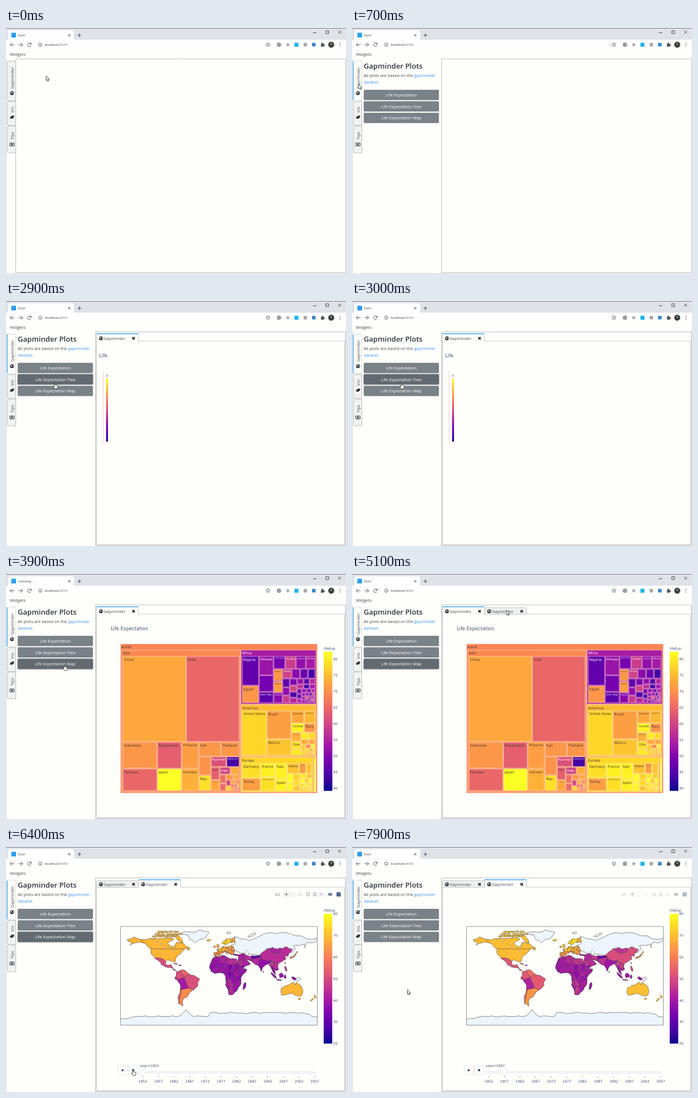
Recreate the animation shown at these times as an HTML page with a canvas. Size 610 by 440 pixels, loop 8000 ms.

```html
<!DOCTYPE html>
<html lang="en">
<head>
<meta charset="utf-8">
<title>Dash</title>
<style>
  html, body { margin: 0; width: 100%; height: 100%; overflow: hidden; background: #fefefb; }
  canvas { display: block; width: 610px; height: 440px; }
</style>
</head>
<body>
<canvas id="stage"></canvas>
<script>
const cv = document.getElementById('stage'), g = cv.getContext('2d');
const dpr = window.devicePixelRatio || 1;
cv.width = 610 * dpr; cv.height = 440 * dpr;

const LOOP = 8000, PAPER = '#fefefb', INK = '#2a3f5f', ICON = '#54575b', DARK = '#2c2f33';
const UI = '"Open Sans", "Noto Sans", sans-serif', PLOT = '"DejaVu Sans", sans-serif';

// ---------- helpers ----------
function paint(fill, stroke, lw = 1) {
  if (fill) { g.fillStyle = fill; g.fill(); }
  if (stroke) { g.strokeStyle = stroke; g.lineWidth = lw; g.stroke(); }
}
function rect(x, y, w, h, fill, stroke, lw) {
  g.beginPath(); g.rect(x, y, w, h); paint(fill, stroke, lw);
}
function round(x, y, w, h, r, fill, stroke, lw) {
  g.beginPath(); g.roundRect(x, y, w, h, r); paint(fill, stroke, lw);
}
function disc(x, y, r, fill, stroke, lw) {
  g.beginPath(); g.arc(x, y, r, 0, 7); paint(fill, stroke, lw);
}
function path(pts, close) {
  g.beginPath();
  pts.forEach(p => g.lineTo(p[0], p[1]));
  if (close) g.closePath();
}
const pairs = s => s.trim().split(/\s+/).map(p => p.split(',').map(Number));
const line = (s, color, lw) => { path(pairs(s)); paint(null, color, lw); };
function cross(x, y, r, color, lw) {
  path([[x - r, y - r], [x + r, y + r]]); paint(null, color, lw);
  path([[x + r, y - r], [x - r, y + r]]); paint(null, color, lw);
}
function plus(x, y, r, color, lw) {
  path([[x - r, y], [x + r, y]]); paint(null, color, lw);
  path([[x, y - r], [x, y + r]]); paint(null, color, lw);
}
function text(s, x, y, size, color, { font = UI, align = 'left', weight = 400 } = {}) {
  g.font = `${weight} ${size}px ${font}`;
  g.textAlign = align;
  g.fillStyle = color; g.fillText(s, x, y);
  return x + g.measureText(s).width;
}
const label = (s, x, y, size = 6.1, align = 'left') => text(s, x, y, size, '#3a4d6a', { font: PLOT, align });
const noise = n => { const v = Math.sin(n * 127.1 + 3.7) * 43758.5453; return v - Math.floor(v); };
const clamp = v => Math.max(0, Math.min(1, v));
const ramp = (t, from, to) => clamp((t - from) / (to - from));

const STOPS = '0d0887 46039f 7201a8 9c179e bd3786 d8576b ed7953 fb9f3a fdca26 f0f921'.split(' ')
  .map(h => [0, 2, 4].map(i => Math.min(255, parseInt(h.substr(i, 2), 16) * 1.05)));
function plasma(f) {
  f = clamp(f) * 9;
  const i = Math.min(8, Math.floor(f)), k = f - i;
  return `rgb(${STOPS[i].map((c, j) => Math.round(c + (STOPS[i + 1][j] - c) * k))})`;
}
function colorbar(x, y, w, h) {
  const gr = g.createLinearGradient(0, y + h, 0, y);
  for (let i = 0; i <= 9; i++) gr.addColorStop(i / 9, plasma(i / 9));
  rect(x, y, w, h, gr);
}

// ---------- browser ----------
function browser(title) {
  rect(0, 0, 610, 21, '#dfe2e7');
  rect(0, 0, 610, 1, '#7b8086');
  round(4, 4, 118, 20, 4, '#fefefe');
  rect(0, 21, 610, 19, '#fefefe');
  round(9.5, 8.5, 8.5, 8.5, 1, '#2c9fec');
  text(title, 21.5, 15, 5.6, '#4a4d52');
  cross(113.5, 13, 2, '#444');
  plus(131.7, 13, 3.2, '#444');
  line('551,8.5 556.5,8.5', '#333');
  rect(573.8, 5, 5, 5, null, '#333', .9);
  cross(598.5, 7.5, 2.5, '#333', .9);

  for (const [x, d] of [[7.5, 1], [30, -1]]) {
    path([[x, 30], [x + 7.5 * d, 30]]); paint(null, ICON);
    path([[x + 3.5 * d, 26.5], [x, 30], [x + 3.5 * d, 33.5]]); paint(null, ICON);
  }
  g.beginPath(); g.arc(42, 30, 3.2, .5, 5.6); paint(null, ICON);
  path(pairs('45.8,26.2 45.8,29.6 42.4,29.6'), true); paint(ICON);
  disc(61.5, 30, 3.1, null, ICON, .8);
  line('61.5,29.6 61.5,32', ICON, .9); line('61.5,28 61.5,28.8', ICON, .9);
  text(':8050', text('localhost', 69.5, 32.2, 6.1, '#333'), 32.2, 6.1, '#777');

  path(Array.from({ length: 10 }, (_, i) => {
    const a = i * Math.PI / 5 - Math.PI / 2, r = i % 2 ? 1.7 : 3.8;
    return [470 + r * Math.cos(a), 30 + r * Math.sin(a)];
  }), true);
  paint(null, ICON, .8);
  disc(489.7, 30, 4, '#9b9da0');
  disc(505.5, 30, 3, '#b4b6b8');
  rect(517.5, 26.5, 7.2, 7.2, '#1db4ee');
  disc(537, 30, 3.4, '#a9abad');
  rect(549, 26.7, 6.4, 6.4, '#3c86c6');
  rect(565, 28.2, 5.4, 5.4, ICON); disc(567.6, 27.6, 1.4, ICON); disc(571, 30.8, 1.4, ICON);
  disc(583.5, 30, 5.4, '#3a403b'); disc(583.5, 28.6, 1.8, '#85887f');
  for (let i = -1; i < 2; i++) disc(599, 30 + i * 3, .8, ICON);
  rect(0, 39, 610, 401, PAPER);
  text('Widgets', 7, 50, 7.5, '#43474b');
}

// ---------- page ----------
function globe(x, y) {
  disc(x, y, 3.5, DARK);
  g.save(); g.translate(x, y);
  path(pairs('-2.4,-1.4 -.6,-2.6 .4,-1 -.8,.1 -.3,2 -1.5,.6'), true); paint('#e8e9ea');
  rect(1.2, -.8, 1.2, 1.9, '#e8e9ea');
  g.restore();
}
function sideTab(y, h, name, base, active) {
  round(2.5, y + .5, 15, h - 1, [2, 0, 0, 2], active ? PAPER : '#f1f2f2', active ? '#dcdddd' : '#b9bbbc');
  if (active) rect(1.6, y + 1, 1.3, h - 2, '#3ea5ee');
  g.save(); g.translate(13.6, base); g.rotate(-Math.PI / 2);
  text(name, 0, 0, 7.4, '#4a4d50');
  g.restore();
}
function sidebar(open) {
  rect(0, 55, 1, 385, '#d5d7d8');
  sideTab(59, 72, 'Gapminder', 109, open);
  sideTab(131.5, 44, 'Iris', 152, false);
  sideTab(175.5, 49, 'Tips', 200.5, false);
  globe(10.7, 117);
  g.beginPath(); g.moveTo(7, 163); g.quadraticCurveTo(7, 157, 14.5, 157);
  g.quadraticCurveTo(14.5, 164, 8.4, 162.6); paint(DARK);
  rect(6.9, 206.6, 7.6, 5.2, null, DARK); disc(10.7, 209.2, 1.6, DARK);
}
function button(y, name, dark, ring) {
  if (ring) round(20, y - 1, 137, 20.5, 3, '#c3c7ca');
  round(21, y, 135, 18.5, 2, dark ? '#636b70' : '#7a8288');
  text(name, 88.5, y + 11.9, 7.45, '#fff', { align: 'center' });
}
function panel(t) {
  text('Gapminder Plots', 21, 73, 13.1, '#2f3439', { weight: 600 });
  text('gapminder', text('All plots are based on the ', 21, 88.4, 7.5, '#43474b'), 88.4, 7.5, '#3b93ec');
  text('.', text('dataset', 21, 100.4, 7.5, '#3b93ec'), 100.4, 7.5, '#43474b');
  button(111, 'Life Expectation');
  button(131.6, 'Life Expectation Tree', t >= 1500 && t < 3800, t >= 1900 && t < 3800);
  button(152.2, 'Life Expectation Map', t >= 3400 && t < 6900, t >= 3800 && t < 6900);
}
function tab(x, active) {
  const y = active ? 58 : 60;
  round(x + .5, y + .5, 75, 72 - y, [2, 2, 0, 0], active ? PAPER : '#eeefef', '#c2c4c5', .9);
  if (active) { rect(x + .5, 58, 75, 1.4, '#3ea5ee'); rect(x + 1, 71, 74, 2, PAPER); }
  globe(x + 8.3, 67);
  text('Gapminder', x + 13.2, 69.8, 7.4, '#4a4d50');
  cross(x + 66.8, 67, 2.2, '#222', 1.7);
}

// ---------- treemap ----------
// Populations: the largest are given, the rest shrink by a constant ratio.
function continent(name, life, heads, next, ratio, count, spread, known) {
  const named = known.split(', ').map(s => s.match(/^(.*) (\S+)$/));
  const kids = Array.from({ length: count }, (_, i) => ({
    name: named[i] ? named[i][1] : '',
    life: named[i] ? +named[i][2] : life + spread * (noise(life + i) - .5),
    v: heads[i] || next * ratio ** (i - heads.length)
  }));
  return { name, life, kids, v: kids.reduce((s, k) => s + k.v, 0) };
}
const WORLD = [
  continent('Asia', 69.4, [1319, 1110], 223, .84, 33, 20,
    'China 73, India 65, Indonesia 71, Pakistan 65, Bangladesh 64, Japan 83, Philippines 72, Vietnam 74, Iran 71, Thailand 71, Korea, Rep. 79, Myanmar 62, Afghanistan 44, Nepal 64, Saudi Arabia 73, Iraq 60'),
  continent('Africa', 54.5, [135, 80, 76, 65], 44, .925, 52, 22,
    'Nigeria 47, Egypt 71, Ethiopia 53, Congo, Dem. Rep. 46, South Africa 49, Sudan 59, Tanzania 52, Kenya 54, Morocco 71, Algeria 72, Uganda 51, Ghana 60'),
  continent('Americas', 75.4, [301, 190, 109], 44, .853, 25, 14,
    'United States 78, Brazil 72, Mexico 76, Colombia 73, Argentina 75, Canada 81, Peru 71, Venezuela 74, Chile 79'),
  continent('Europe', 77.9, [82, 71, 61, 60, 58, 40, 38], 22, .876, 30, 9,
    'Germany 79, Turkey 72, France 81, United Kingdom 79, Italy 81, Spain 81, Poland 76, Romania 72'),
  continent('Oceania', 81, [20], 4, 1, 2, 0, 'Australia 81, New Zealand 80')
];

function squarify(items, x0, y0, x1, y1) {
  let value = items.reduce((s, k) => s + k.v, 0), i = 0;
  while (i < items.length) {
    const dx = x1 - x0, dy = y1 - y0, row = [items[i]];
    const max = items[i].v, alpha = Math.max(dy / dx, dx / dy) / value;
    let sum = max, best = Infinity;
    const worst = min => { const b = sum * sum * alpha; return Math.max(max / b, b / min); };
    best = worst(max);
    while (++i < items.length) {
      sum += items[i].v;
      const r = worst(items[i].v);
      if (r > best) { sum -= items[i].v; break; }
      best = r; row.push(items[i]);
    }
    const flat = dx < dy, thick = (flat ? dy : dx) * sum / value;
    let at = flat ? x0 : y0;
    for (const k of row) {
      const len = (flat ? dx : dy) * k.v / sum;
      k.box = flat ? [at, y0, len, thick] : [x0, at, thick, len];
      at += len;
    }
    if (flat) y0 += thick; else x0 += thick;
    value -= sum;
  }
}
const GAP = 1.5, PAD = 2.3, HEAD = 11.2;
function nest(kids, [x, y, w, h]) {
  const e = GAP / 2;
  squarify(kids, x + PAD - e, y + HEAD - e, x + w - PAD + e, y + h - PAD + e);
  kids.forEach(k => {
    const [a, b, c, d] = k.box;
    k.box = [a + e, b + e, Math.max(.2, c - GAP), Math.max(.2, d - GAP)];
  });
}
function cell({ name, life, box: [x, y, w, h] }) {
  const f = (life - 39.6) / 43;
  rect(x, y, w, h, plasma(f), 'rgba(255,245,240,.75)', .7);
  if (!name || w < 6) return;
  g.font = `6.2px ${PLOT}`;
  const size = Math.min(6.2, 6.2 * (w - 3) / g.measureText(name).width);
  if (size > 1) text(name, x + 1.6, y + 1.8 + size * .95, size, f < .54 ? '#fff' : '#4a3a34', { font: PLOT });
}
const ROOT = { name: 'world', life: 68.9, box: [205.5, 125.5, 353, 268] };
nest(WORLD, ROOT.box);
WORLD.forEach(c => nest(c.kids, c.box));

function treemap() {
  label('Life Expectation', 188, 100.8, 8.3);
  cell(ROOT);
  for (const c of WORLD) { cell(c); c.kids.forEach(cell); }
  label('lifeExp', 570, 135.5);
  colorbar(570, 139.5, 15.5, 250);
  for (let v = 40; v <= 80; v += 5) label(v, 587, 389.5 - (v - 39.6) * 5.81);
}

// ---------- world map ----------
const px = ([lon, lat]) => [382 + lon * .981, 231.3 - lat * .984];

// Coasts: a few corners, broken up by midpoint displacement.
// The offset depends only on the edge, so shared borders stay joined.
function rough(a, b, n) {
  if (!n) return [a];
  const s = a[0] < b[0] || (a[0] === b[0] && a[1] < b[1]) ? 1 : -1;
  const k = s * (noise(a[0] + b[0] + 1.7 * (a[1] + b[1])) - .5) * .28;
  const m = [(a[0] + b[0]) / 2 - (b[1] - a[1]) * k, (a[1] + b[1]) / 2 + (b[0] - a[0]) * k];
  return [...rough(a, m, n - 1), ...rough(m, b, n - 1)];
}
const coast = s => {
  const p = pairs(s).map(px);
  return p.flatMap((a, i) => rough(a, p[(i + 1) % p.length], 2));
};
const blob = (lon, lat, rx, ry = rx, tilt = 0) => Array.from({ length: 9 }, (_, i) => {
  const a = i * Math.PI * 2 / 9, r = .75 + .5 * noise(lon + lat + i);
  const u = rx * r * Math.cos(a), v = ry * r * Math.sin(a);
  return px([lon + u * Math.cos(tilt) - v * Math.sin(tilt), lat + u * Math.sin(tilt) + v * Math.cos(tilt)]);
});

const EDGE = '#4a4a4a', LAND = '#ebf5fb', areas = [];
const area = (pts, v, parts = [], gain = 2) => areas.push({ pts, v, parts, gain });
const land = (s, ...rest) => area(coast(s), ...rest);

// Countries inside a coast: the cells nearest to each seed [lon, lat, value].
function voronoi(seeds) {
  const pts = seeds.map(px), R = 300;
  return pts.map((p, i) => {
    let poly = [[-R, -R], [R, -R], [R, R], [-R, R]].map(c => [p[0] + c[0], p[1] + c[1]]);
    pts.forEach((q, j) => {
      if (i === j) return;
      const nx = q[0] - p[0], ny = q[1] - p[1];
      const side = a => (a[0] - (p[0] + q[0]) / 2) * nx + (a[1] - (p[1] + q[1]) / 2) * ny;
      poly = poly.flatMap((a, k) => {
        const b = poly[(k + 1) % poly.length], sa = side(a), sb = side(b), f = sa / (sa - sb);
        const out = sa <= 0 ? [a] : [];
        if ((sa < 0) !== (sb < 0)) out.push([a[0] + (b[0] - a[0]) * f, a[1] + (b[1] - a[1]) * f]);
        return out;
      });
    });
    return { pts: poly, v: seeds[i][2] };
  });
}
function scatter(lon0, lon1, lat0, lat1, step, value) {
  const out = [];
  for (let lat = lat0; lat < lat1; lat += step)
    for (let lon = lon0; lon < lon1; lon += step * 1.15) {
      const k = lat * 3.1 + lon * 7.3;
      out.push([lon + noise(k) * step * .9, lat + noise(k + 1) * step * .9, value(lat, noise(k + 2))]);
    }
  return voronoi(out);
}

// Land without data: northern Asia, Greenland, Antarctica.
land('28,71 42,67 68,69 104,77 140,73 180,69 177,62 160,60 157,51 156,58 136,55 140,49 130,42 75,37 30,46 22,56 30,60');
land('-70,78 -35,84 -18,79 -24,70 -43,60 -53,66 -57,75');
area(blob(60, 74, 9, 1.8, .4)); area(blob(18, 78, 4, 2)); area(blob(145, -6, 5, 3));
const south = [[-190, -100]];
for (let lon = -190; lon <= 190; lon += 5) {
  const bump = (at, w) => Math.exp(-(((lon - at) / w) ** 2));
  south.push([lon, (lon < -15 ? -75 : -69) + 11 * bump(-60, 6) - 9 * bump(182, 16) - 5 * bump(-180, 22) + 2.5 * noise(lon)]);
}
area([...south, [190, -100]].map(px));

// Americas
land('-168,66 -156,71 -115,68 -95,70 -82,67 -94,59 -80,52 -78,61 -65,59 -56,52 -66,45 -76,36 -80,26 -95,29 -97,26 -117,32 -124,40 -124,48 -135,59 -152,60 -163,55 -160,60',
  69, voronoi([[-100, 62, 69], [-100, 36, 68.7], [-182, 62, 68.7]]), 1);
for (let i = 0; i < 14; i++) {
  const row = Math.floor(i / 5);
  area(blob(-118 + (i % 5) * 10 + row * 5, 71.5 + row * 4 + noise(i), 3.5 + 2 * noise(i + 9), 1.6), 69);
}
area(blob(-73, 68, 9, 3.5, -.8), 69); area(blob(-56, 49, 2.5), 69);
land('-117,32 -107,32 -97,26 -97,20 -88,21 -83,10 -77,8 -92,15 -105,20 -112,29', 50);
area(blob(-79, 22, 4, 1, -.3), 59); area(blob(-71, 19, 2.5, 1), 45);
land('-77,8 -62,10 -50,1 -35,-6 -40,-20 -48,-26 -57,-36 -65,-42 -66,-55 -74,-50 -71,-30 -70,-18 -81,-5', 51,
  voronoi([[-54, -10, 51], [-74, 4, 51], [-65, 10, 55], [-84, -9, 44], [-66, -15, 40], [-62, -34, 62], [-78, -31, 55]]));

// Africa
land('-6,36 10,37 20,31 32,31 43,12 51,12 40,-4 40,-15 33,-27 26,-34 18,-34 12,-17 9,4 -8,4 -17,14 -13,28', 38,
  scatter(-20, 52, -36, 38, 8.5, (lat, r) => (lat > 20 || lat < -16 ? 38 : 34) + r * 7));
area(blob(47, -19, 2.5, 6.5, -.3), 37);

// Europe
land('-9,37 -9,43 -2,44 -4,48 8,54 19,54 24,54 29,46 24,38 20,40 13,45 17,39 10,44 -1,37', 65,
  scatter(-12, 32, 35, 58, 5.2, (lat, r) => 59 + r * 8 + (lat > 45 ? 3 : 0)));
land('5,59 13,56 18,60 24,65 21,60 30,62 29,70 15,68 8,63', 72, voronoi([[6, 64, 72.7], [18, 60, 72], [32, 63, 66.5]]));
area(blob(-2, 54, 2.2, 4, .3), 69); area(blob(-8, 53, 1.8), 67); area(blob(-19, 65, 4, 1.6), 72);

// Asia
land('26,40 44,41 48,38 61,37 61,25 50,30 58,22 44,13 35,28 36,36 28,37', 43,
  scatter(24, 62, 10, 42, 10, (lat, r) => 37 + r * 8));
land('61,37 75,37 79,31 88,27 98,27 92,22 87,21 80,15 77,8 73,18 61,25', 37, voronoi([[65, 36, 29], [67, 27, 43], [80, 22, 37.5]]));
land('74,38 87,49 98,43 112,43 122,53 135,48 129,42 126,35 120,39 122,30 108,21 98,24 97,28 88,27 79,31', 44, [], 6.5);
land('88,49 98,52 116,50 112,43 98,43', 42, [], 3);
land('92,22 98,24 108,21 109,12 105,9 101,13 103,2 98,9 94,17', 41, scatter(92, 110, 0, 24, 7, (lat, r) => 36 + r * 13));
for (let i = 0; i < 6; i++) area(blob(131 + i * 2.3, 33 + i * i * .4, 1.7, 1.3, .6), 63);
area(blob(101, 0, 7, 1.8, -.8), 37.5); area(blob(110, -7.5, 4.5, .9, -.1), 37.5);
area(blob(114, 1, 4, 4.5), 38); area(blob(121, -2, 1.8, 3.5), 37.5); area(blob(137, -5, 4.5, 2.5, -.5), 37.5);
area(blob(122, 13, 1.6, 5.5, .3), 48); area(blob(121, 23.5, .8, 1.5), 58); area(blob(81, 7.5, .9, 1.4), 57);

// Oceania
land('114,-22 122,-18 136,-12 140,-17 142,-11 153,-26 150,-37 138,-35 132,-32 115,-35', 69, [], 1.2);
area(blob(147, -42, 1.7), 69); area(blob(176, -38, 1.6, 3, .5), 69); area(blob(170, -44, 1.4, 4, -.8), 69);

const LAKES = [blob(51, 42, 2.6, 5, .3)];
for (let i = 0; i < 6; i++) LAKES.push(blob(-121 + i * 7.5, 66 - i * 4, 1.8, .8));

function worldMap(later) {
  const tint = (v, gain) => v ? plasma((v + (later ? gain : 0) - 20) / 60) : LAND;
  g.save();
  g.beginPath(); g.rect(205.5, 142.8, 353, 177.2); g.clip();
  g.lineJoin = 'round';
  for (const a of areas) {
    path(a.pts, true); paint(tint(a.v, a.gain));
    g.save(); g.clip();
    for (const p of a.parts) { path(p.pts, true); paint(tint(p.v, a.gain), EDGE, .5); }
    g.restore();
    path(a.pts, true); paint(null, EDGE, .65);
  }
  for (const l of LAKES) { path(l, true); paint(PAPER, EDGE, .4); }
  g.restore();
  rect(205.5, 142.8, 353, 177.2, null, '#666', .7);

  label('lifeExp', 570, 116.2);
  colorbar(570, 120, 15.3, 233);
  for (let v = 20; v <= 80; v += 10) label(v, 587, 355.2 - (v - 20) * 3.883);
}
function controls(year, knob) {
  for (const x of [201.5, 219.5]) rect(x, 393, 17, 16, PAPER, '#dfe5ee', .9);
  path(pairs('207.8,398.6 212.2,400.9 207.8,403.2'), true); paint(INK);
  rect(226.2, 399, 3.6, 3.6, INK);
  label('year=' + year, 240, 395.3);
  round(242, 403, 313, 3.2, 1.6, '#f5f6f9', '#dde3ec', .8);
  disc(knob, 404.6, 5, '#fcfcfc', '#dde2ea', .9);
  for (let i = 0; i < 12; i++) {
    const x = 245.3 + i * 28.05;
    rect(x - .3, 411.5, .6, 3, '#596880');
    label(1952 + i * 5, x, 423.4, 6.1, 'center');
  }
}
function modebar(alpha) {
  if (alpha <= 0) return;
  const soft = '#c3c8d0', firm = '#747f90';
  g.save(); g.globalAlpha = alpha;
  round(483.5, 82.8, 7.6, 5.4, 1, soft); disc(487.3, 85.5, 1.5, PAPER);
  plus(503, 85, 4, firm, 1.1);
  g.setLineDash([1.2, 1]); rect(511.5, 82, 6.5, 6.5, null, soft, .9); g.setLineDash([]);
  g.beginPath(); g.ellipse(527, 84.8, 3.6, 2.3, -.3, 0, 7); paint(null, soft, .9);
  for (const x of [542, 554]) rect(x - 3.2, 82, 6.4, 6.4, soft);
  plus(542, 85.2, 2.2, PAPER); line('551.8,85.2 556.2,85.2', PAPER);
  cross(566, 85.2, 3.2, soft, 1.1);
  path(pairs('577,85 579.5,82.4 585,82.4 585,87.6 579.5,87.6'), true); paint(firm);
  rect(593, 81.3, 7.6, 7.6, '#52648c');
  g.restore();
}

// Narrow plots seen before they are resized.
function earlyTree() {
  label('Life', 167, 100.8, 8.3);
  rect(173.8, 125, .8, 133, '#e8bfc4');
  label('li', 179.6, 135.5);
  colorbar(179.6, 139.5, 3.4, 113);
}
function earlyMap() {
  g.save(); g.beginPath(); g.rect(162, 73, 21.2, 365); g.clip();
  label('lifeExp', 179.6, 116.2);
  colorbar(179.6, 120, 3.4, 96.5);
  rect(173.5, 162.6, 2.2, .9, '#444');
  label('year', 174, 258.5);
  line('166.5,257 168.8,257 168.8,271', '#dfe5ee', .9);
  disc(178.5, 268, 4.5, '#fcfcfc', '#dde2ea', .9);
  for (let i = 0; i < 5; i++) rect(169.5 + i * 2.1, 275, 1.3, 4, '#3b424d');
  rect(166, 282, 17, 4.6, '#46536b');
  rect(169, 283.8, 11, 1, '#8490a6');
  g.restore();
}

// ---------- pointer ----------
// Moves: start, end, x, y.
const MOVES = [[0, 200, 12, 101], [1000, 1400, 75, 136], [1500, 2300, 80, 143], [2600, 2900, 88, 147],
  [2900, 3900, 105, 163], [4400, 5100, 277, 65], [5600, 6400, 228, 400], [6500, 6900, 210, 400], [7300, 7900, 99.5, 256]];
function pointer(t) {
  let x = 72, y = 86;
  for (const [from, to, nx, ny] of MOVES) {
    const f = ramp(t, from, to), e = f * f * (3 - 2 * f);
    x += (nx - x) * e; y += (ny - y) * e;
  }
  const within = (l, r, top, end) => x > l && x < r && y > top && y < end;
  const hand = t >= 700 && (within(21, 156, 111, 171) || (t >= 5700 && within(201, 237, 393, 410)));
  g.save(); g.translate(x, y); g.lineJoin = 'round';
  path(pairs(hand
    ? '-.8,.2 .6,.2 .8,3.6 3,4 5,5 4.8,8 3.8,10.4 -.2,10.4 -3,6.8 -2.6,5.8 -.9,6.8'
    : '0,0 0,8.4 1.9,6.7 3.2,9.6 4.6,9 3.3,6.1 5.9,6'), true);
  paint('#fff', '#3a3a3a', .9);
  g.restore();
}

// ---------- scene ----------
function draw(t) {
  g.setTransform(dpr, 0, 0, dpr, 0, 0);
  const open = t >= 600, docked = t >= 2800, second = t >= 4400, onMap = t >= 5200;
  const busy = (t >= 2100 && t < 2800) || (t >= 3800 && t < 4400);
  browser(busy ? 'Updating...' : 'Dash');
  const left = open ? 160 : 17;
  rect(left + .5, 55.5, 609 - left, 384, PAPER, '#bfc1c2');
  sidebar(open);
  if (open) panel(t);
  if (docked) {
    rect(161, 56, 448, 383, '#e9eaea');
    rect(162, 56, 446, 16, PAPER);
    rect(162.5, 72, 445, 365.5, PAPER, '#c2c4c5', .9);
    tab(162, !onMap);
    if (second) tab(237.7, onMap);
    if (!onMap) t < 3100 ? earlyTree() : treemap();
    else if (t < 5600) earlyMap();
    else {
      const later = t >= 7000;
      worldMap(later);
      controls(later ? 1957 : 1952, 245.3 + 28.05 * ramp(t, 6900, 7200));
    }
    if (t >= 5600) modebar(ramp(t, 5600, 5900) * (1 - .55 * ramp(t, 7600, 7900)));
    else if (t >= 4500 && t < 4800) modebar(.6 - Math.abs(t - 4600) / 300);
  }
  pointer(t);
}

let shown = -1;
function tick(now) {
  const t = Math.floor((now % LOOP) / 100) * 100;
  if (t !== shown) draw(shown = t);
  requestAnimationFrame(tick);
}
draw(0);
requestAnimationFrame(tick);
</script>
</body>
</html>
```
